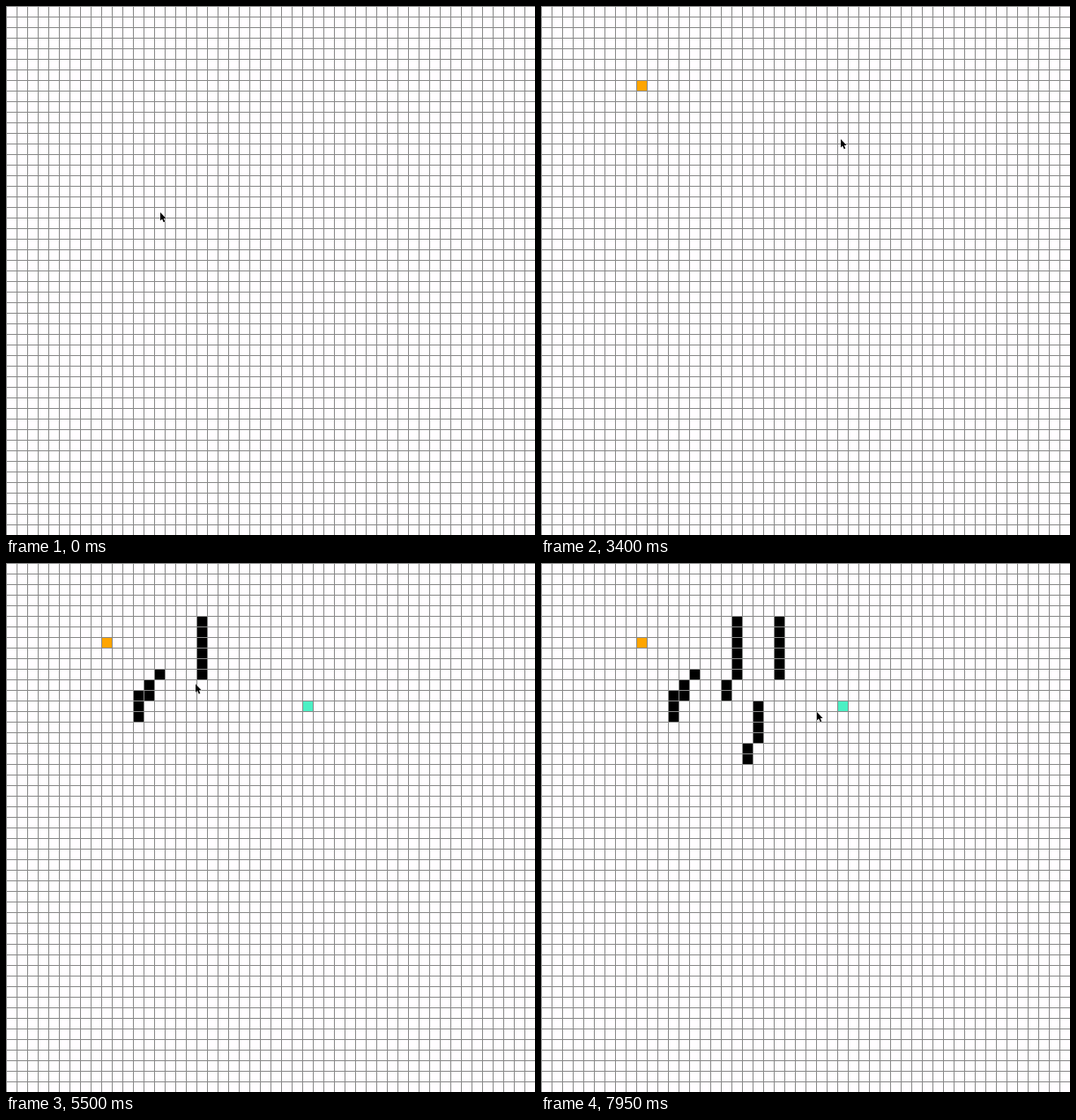
Recreate the animation shown at these times as an HTML page without scripts. Size 600x600 px, loop 8000 ms.

```html
<!DOCTYPE html>
<html lang="en">
<head>
<meta charset="utf-8">
<title>Grid drawing</title>
<style>
  /* One tick is 50 ms; a cell shows once --tick reaches its --at. */
  @property --tick { syntax: "<number>"; inherits: true; initial-value: 0; }
  html, body { margin: 0; width: 100%; height: 100%; overflow: hidden; background: #fffdff; }
  svg { display: block; width: 100%; height: 100%; }
  .cells { --tick: 0; stroke: #000; animation: tick 8s steps(160) infinite; }
  .cells path { opacity: calc(var(--tick) - var(--at) + 1); }
  .grid { shape-rendering: crispEdges; }
  .cursor {
    stroke: #fff; stroke-width: .7; paint-order: stroke;
    animation: move 8s steps(4) -7.95s infinite;
  }
  @keyframes tick { to { --tick: 160; } }
  /* Runs one tick late so that key poses sit 200 ms apart. */
  @keyframes move {
    0% { transform: translate(175px, 234px); }
    19.375% { transform: translate(175px, 234px); animation-timing-function: step-end; }
    20% { transform: translate(176px, 226px); }
    22.5% { transform: translate(162px, 116px); }
    25% { transform: translate(136px, 85px); }
    27.5% { transform: translate(123px, 83px); }
    30% { transform: translate(115px, 87px); animation-timing-function: steps(2); }
    31.25%, 32.5% { transform: translate(111px, 89px); }
    35% { transform: translate(175px, 99px); }
    37.5% { transform: translate(279px, 128px); }
    40% { transform: translate(331px, 145px); }
    42.5% { transform: translate(343px, 153px); animation-timing-function: steps(2); }
    43.75% { transform: translate(338px, 159px); }
    45.625% { transform: translate(338px, 159px); animation-timing-function: steps(3); }
    47.5% { transform: translate(298px, 167px); }
    50% { transform: translate(187px, 178px); }
    52.5% { transform: translate(153px, 178px); }
    55% { transform: translate(150px, 169px); }
    57.5% { transform: translate(172px, 126px); }
    60% { transform: translate(204px, 78px); }
    62.5% { transform: translate(222px, 61px); }
    65% { transform: translate(222px, 80px); }
    67.5% { transform: translate(216px, 132px); }
    70% { transform: translate(212px, 153px); }
    72.5% { transform: translate(246px, 164px); }
    75% { transform: translate(239px, 212px); animation-timing-function: step-end; }
    75.625% { transform: translate(236px, 224px); animation-timing-function: steps(3); }
    77.5% { transform: translate(251px, 166px); }
    80% { transform: translate(284px, 91px); }
    82.5% { transform: translate(274px, 62px); }
    85% { transform: translate(270px, 67px); }
    87.5% { transform: translate(270px, 122px); }
    90.625% { transform: translate(270px, 122px); animation-timing-function: steps(3); }
    92.5% { transform: translate(276px, 138px); }
    95% { transform: translate(291px, 168px); }
    97.5% { transform: translate(307px, 174px); animation-timing-function: steps(2); }
    98.75% { transform: translate(313px, 169px); animation-timing-function: step-end; }
    99.375%, 100% { transform: translate(175px, 234px); }
  }
</style>
</head>
<body>
<svg viewBox="0 0 600 600">
  <defs>
    <pattern id="lines" width="12" height="12" patternUnits="userSpaceOnUse">
      <path d="M0 0H12V1H1V12H0Z" fill="#888"/>
    </pattern>
  </defs>
  <g class="cells" transform="scale(12)">
    <path d="M9.5 7v1" stroke="#ffa500" style="--at:54"/>
    <path d="M28.5 13v1" stroke="#4bf0c4" style="--at:75"/>

    <path d="M12.5 14v1" style="--at:88"/>
    <path d="M12.5 13v1" style="--at:90"/>
    <path d="M12.5 12v1" style="--at:91"/>
    <path d="M13.5 12v1" style="--at:92"/>
    <path d="M13.5 11v1" style="--at:93"/>
    <path d="M14.5 10v1" style="--at:94"/>

    <path d="M18.5 5v1" style="--at:103"/>
    <path d="M18.5 6v1" style="--at:105"/>
    <path d="M18.5 7v1" style="--at:106"/>
    <path d="M18.5 8v1" style="--at:107"/>
    <path d="M18.5 9v1" style="--at:108"/>
    <path d="M18.5 10v1" style="--at:109"/>
    <path d="M17.5 11v1" style="--at:111"/>
    <path d="M17.5 12v1" style="--at:112"/>

    <path d="M20.5 13v1" style="--at:118"/>
    <path d="M20.5 14v1" style="--at:119"/>
    <path d="M20.5 15v1" style="--at:120"/>
    <path d="M20.5 16v1" style="--at:121"/>
    <path d="M19.5 17v1" style="--at:122"/>
    <path d="M19.5 18v1" style="--at:123"/>

    <path d="M22.5 5v1" style="--at:136"/>
    <path d="M22.5 6v1" style="--at:138"/>
    <path d="M22.5 7v1" style="--at:139"/>
    <path d="M22.5 8v1" style="--at:140"/>
    <path d="M22.5 9v1" style="--at:141"/>
    <path d="M22.5 10v1" style="--at:142"/>
  </g>
  <rect class="grid" width="600" height="600" fill="url(#lines)"/>
  <path class="cursor" d="M0 0V9.4L2.1 7.5L3.7 11.2L5.3 10.5L3.8 7H6.6Z"/>
</svg>
</body>
</html>
```
